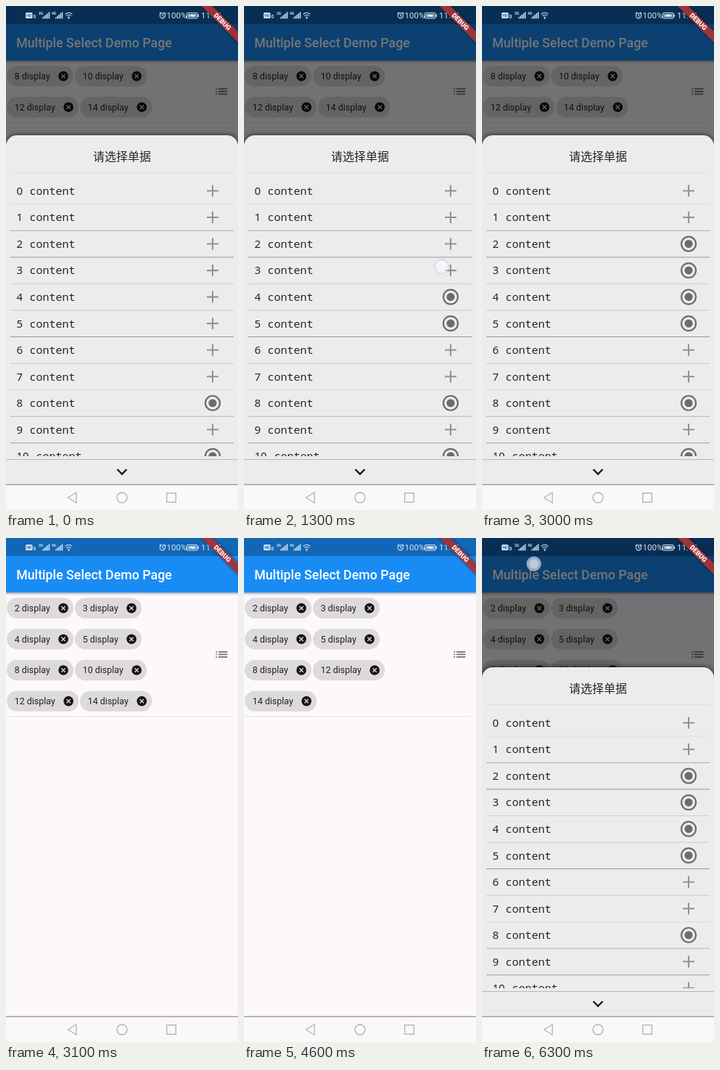
Recreate the animation shown at these times as an HTML page. Size 320 px wide and 694 px high, loop 6400 ms.

```html
<!DOCTYPE html>
<html lang="en">
<head>
<meta charset="utf-8">
<title>Multiple Select Demo</title>
<style>
  html, body { margin: 0; width: 100%; height: 100%; overflow: hidden; background: #fcf8fc; }
  svg { display: block; width: 100vw; height: 100vh; }
  text { font-family: Roboto, sans-serif; }
  .title { font-size: 17.78px; font-weight: 500; fill: #fff; }
  .chip rect { fill: #dddadd; }
  .chip text { font-size: 12.44px; fill: #232123; }
  .chip circle { fill: #151315; }
  .chip path { stroke: #dddadd; stroke-width: 1.4; }
  .head { font: 16px "Noto Sans CJK SC", "Noto Sans CJK", sans-serif; fill: #252325; text-anchor: middle; }
  .row { font: 15px "Noto Sans Mono", monospace; fill: #252325; }
  .row .num { font-family: "Noto Sans", sans-serif; }
  .plus { stroke: #949195; stroke-width: 2.1; fill: none; }
  .radio .ring { fill: none; stroke: #6e6b6f; stroke-width: 2.2; }
  .radio .dot { fill: #6e6b6f; }
  .status { fill: #d3e2f2; stroke: none; }
  .status text { font-size: 11.5px; }
  .status .tiny { font-size: 5px; font-weight: 700; }
  .line { fill: none; stroke: #d3e2f2; stroke-width: 1.1; }
  .nav { fill: none; stroke: #b3b0b4; stroke-width: 1.3; }
  .debug { font-size: 9.1px; font-weight: 900; fill: #fff; text-anchor: middle; }
</style>
</head>
<body>
<svg viewBox="0 0 320 694" preserveAspectRatio="none">
  <defs>
    <filter id="blur" x="-20%" y="-20%" width="140%" height="140%"><feGaussianBlur stdDeviation="3"/></filter>
    <clipPath id="list"><rect y="230" width="320" height="390"/></clipPath>
    <clipPath id="screen"><rect width="320" height="659"/></clipPath>
    <linearGradient id="shade" x2="0" y2="1">
      <stop stop-color="#000" stop-opacity=".3"/>
      <stop offset="1" stop-color="#000" stop-opacity="0"/>
    </linearGradient>
    <radialGradient id="glow">
      <stop offset=".5" stop-color="#fafaff" stop-opacity=".75"/>
      <stop offset="1" stop-color="#f2f3ff" stop-opacity=".5"/>
    </radialGradient>
  </defs>

  <rect width="320" height="694" fill="#fcf8fc"/>
  <rect y="75" width="320" height="4" fill="url(#shade)"/>
  <rect width="320" height="75" fill="#198cf4"/>
  <rect width="320" height="25" fill="#1167b5"/>
  <text class="title" x="14.2" y="57">Multiple Select Demo Page</text>
  <g id="chips"></g>
  <path id="rule" d="M0 0H312" stroke="#e2dfe3"/>
  <path id="menu" fill="#747174" d="M3 13h2v-2H3v2zm0 4h2v-2H3v2zm0-8h2V7H3v2zm4 4h14v-2H7v2zm0 4h14v-2H7v2zM7 7v2h14V7H7z"/>

  <g id="modal" clip-path="url(#screen)">
    <rect width="320" height="659" fill="#000" opacity=".54"/>
    <rect y="177" width="320" height="500" rx="15" fill="#000" opacity=".6" filter="url(#blur)"/>
    <rect y="178" width="320" height="500" rx="15" fill="#eeebee"/>
    <text class="head" x="160" y="213">请选择单据</text>
    <path d="M6 229.5H314" stroke="#e1dee1"/>
    <g id="rows" clip-path="url(#list)"></g>
    <path d="M0 624.5H320" stroke="#b9b6ba"/>
    <path d="M153.5 638l6.5 6.5l6.5-6.5" fill="none" stroke="#151315" stroke-width="2.3"/>
  </g>

  <g class="status">
    <rect x="27" y="9" width="9.5" height="8" rx="1.5"/>
    <text class="tiny" x="28.2" y="15" fill="#1167b5">HD</text>
    <text class="tiny" x="37.6" y="17" style="font-size:6.5px">0</text>
    <text class="tiny" x="45" y="12">2G</text>
    <text class="tiny" x="63" y="12">4G</text>
    <g id="bars"></g>
    <path class="line" d="M81.5 11.4q5-4.4 10 0M83.3 13.6q3.2-2.7 6.4 0M85 15.6q1.5-1.2 3 0"/>
    <circle cx="86.5" cy="17" r="1"/>
    <circle class="line" cx="216" cy="13.3" r="3.6"/>
    <path class="line" d="M216 11v2.5l1.7 1M211.6 10.6l2.2-2M220.4 10.6l-2.2-2"/>
    <text x="221.6" y="17">100%</text>
    <rect class="line" x="249.5" y="9.5" width="14.5" height="7.5" rx="1.5"/>
    <rect x="251" y="11" width="11.5" height="4.5" opacity=".75"/>
    <rect x="264.5" y="11.5" width="1.5" height="3.5"/>
    <path d="M253 13.4l4-2.4v1.6h4l-4 2.6v-1.8z" fill="#fff"/>
    <text x="269" y="17">11:36</text>
  </g>

  <rect y="659" width="320" height="35" fill="#fbf8fc"/>
  <path d="M0 659H320" stroke="#a19ea2" stroke-width="1.4"/>
  <g class="nav">
    <path d="M85.5 677L97 669.8V684.2Z"/>
    <circle cx="160" cy="677" r="7"/>
    <rect x="221.7" y="670.7" width="12.6" height="12.6"/>
  </g>

  <g transform="translate(320) rotate(45)">
    <rect x="-40" y="25" width="80" height="10.6" fill="#000" opacity=".4" filter="url(#blur)"/>
    <rect x="-40" y="25" width="80" height="10.6" fill="#a8343a" opacity=".94"/>
    <text class="debug" y="33.5">DEBUG</text>
  </g>
  <circle id="touch" r="9.8" fill="url(#glow)" stroke="#b9bfd8" stroke-opacity=".75"/>
</svg>
<script>
const LOOP = 6400, CLOSE = 3100, REMOVE = 4100, OPEN = 4700;
const ROW_TOP = 254.5, ROW_STEP = 36.53, CHIP_STEP = 42.67;
const RULE_GREYS = [222, 172, 152, 205, 203, 148, 200, 220, 176, 158];

// Time at which each row becomes selected
const picks = [[5, 400], [4, 900], [3, 1400], [2, 2000]];

// Start, end, x, y
const touches = [
  [300, 500, 292, 438],
  [800, 1000, 292, 402],
  [1200, 1500, 272.5, 358.8],
  [1800, 2100, 287, 332],
  [2800, 3000, 160, 641],
  [3900, 4200, 180, 182],
  [4300, 4600, 298, 161],
  [6300, 6400, 71.5, 35.5]
];

const $ = id => document.getElementById(id);
const range = n => [...Array(n).keys()];

function selectedAt(t) {
  const picked = picks.filter(([, at]) => t >= at).map(([n]) => n);
  const kept = t < REMOVE ? [8, 10, 12, 14] : [8, 12, 14];
  return [...picked, ...kept].sort((a, b) => a - b);
}

function chipList(values) {
  let x = 1;
  return values.map((n, i) => {
    const w = n < 10 ? 92.2 : 99.3;
    if (i % 2 === 0) x = 1;
    const y = 96.6 + (i >> 1) * CHIP_STEP;
    const chip = `<g class="chip" transform="translate(${x} ${y})">
      <rect y="-14.2" width="${w}" height="28.4" rx="14.2"/>
      <text x="10.7" y="4.4">${n} display</text>
      <g transform="translate(${w - 14.1})"><circle r="6.8"/><path d="M-2.7-2.7l5.4 5.4m0-5.4l-5.4 5.4"/></g>
    </g>`;
    x += w + 1.8;
    return chip;
  }).join('');
}

function rowList(selected) {
  return range(11).map(n => {
    const y = ROW_TOP + n * ROW_STEP, g = RULE_GREYS[n];
    const icon = selected.includes(n)
      ? '<g class="radio"><circle class="ring" r="10"/><circle class="dot" r="5.6"/></g>'
      : '<path class="plus" d="M-8 0H8M0-8V8"/>';
    const rule = g ? `<path d="M6 18.4H314" stroke="rgb(${g},${g - 2},${g})"/>` : '';
    return `<g transform="translate(0 ${y})">
      <text class="row" y="5.4"><tspan class="num" x="14.4">${n}</tspan><tspan x="${14.5 + 9 * (String(n).length + 1)}">content</tspan></text>
      <g transform="translate(285)">${icon}</g>${rule}</g>`;
  }).join('');
}

$('bars').innerHTML = [50, 68].map(x => range(5).map(i =>
  `<rect x="${x + i * 2.2}" y="${15.5 - i * 1.8}" width="1.5" height="${1.8 + i * 1.8}"/>`).join('')).join('');

let shown = '';
function update(t) {
  const open = t < CLOSE || t >= OPEN;
  const selected = selectedAt(t);
  const chips = t < CLOSE ? [8, 10, 12, 14] : selected;
  const key = open + '|' + selected + '|' + chips;
  if (key !== shown) {
    shown = key;
    const height = Math.ceil(chips.length / 2) * CHIP_STEP;
    $('chips').innerHTML = chipList(chips);
    $('rows').innerHTML = rowList(selected);
    $('rule').setAttribute('transform', `translate(0 ${75 + height})`);
    $('menu').setAttribute('transform', `translate(286.7 ${64.4 + height / 2}) scale(.889)`);
    $('modal').style.display = open ? '' : 'none';
  }
  const touch = touches.find(([from, to]) => t >= from && t < to);
  $('touch').style.display = touch ? '' : 'none';
  if (touch) $('touch').setAttribute('transform', `translate(${touch[2]} ${touch[3]})`);
}

const start = performance.now();
function tick() {
  update((performance.now() - start) % LOOP);
  requestAnimationFrame(tick);
}
tick();
</script>
</body>
</html>
```
